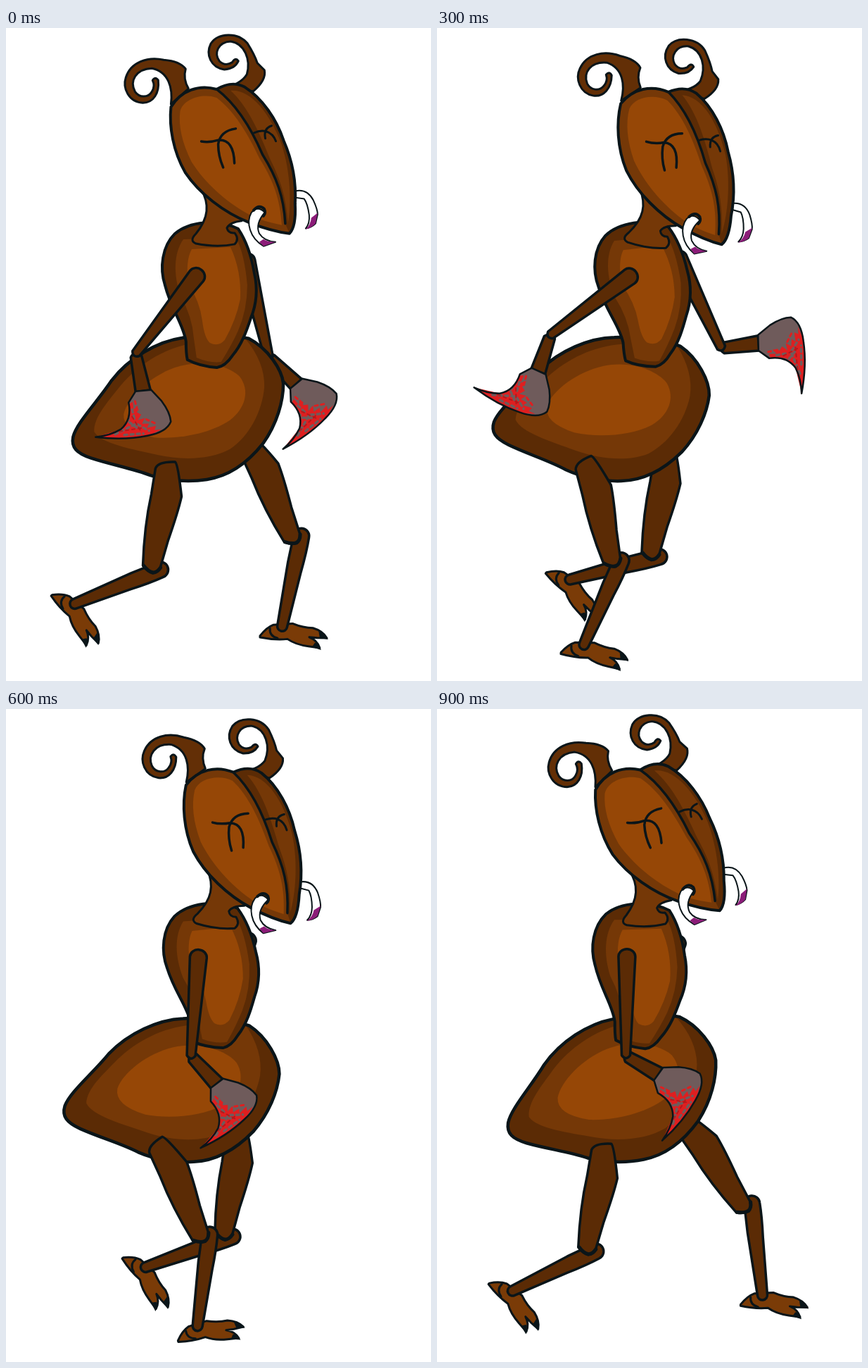
Recreate the animation shown at these times as an HTML page with a canvas. Size 604 px wide and 927 px high, loop 1 s.

```html
<!DOCTYPE html>
<html lang="en">
<head>
<meta charset="utf-8">
<title>Walking ant</title>
<style>
html, body { margin: 0; height: 100%; overflow: hidden; background: #fff; }
canvas { display: block; }
</style>
</head>
<body>
<canvas id="stage" width="604" height="927"></canvas>
<script>
const c = document.getElementById('stage').getContext('2d');
const INK = '#0a1519', DARK = '#5b2b05', MID = '#753807', LIGHT = '#964706';
const GREY = '#6f5b5b', RED = '#de1f20', PURPLE = '#8b1c78';

// Joint angles in degrees at the key steps; limbs hang at 0 and swing forward when positive.
const KEYS = [1, 3, 5, 8, 11];
const JOINTS = {
  head: [2.5, 7.4, 11.6, -5.5],
  nearArm: [-75.7, -53.6, -24.8, 37],
  nearClaw: [-74, -55, -26.6, 73],
  farArm: [44, 25.6, 1, -49],
  farClaw: [76.5, 61.4, 29, -125],
  nearThigh: [-7.6, 16, 43, -8.7],
  nearShin: [-72, -24, 19, -61],
  nearFoot: [51, 8, -36, 42],
  farThigh: [15.7, -8, -33.6, 46],
  farShin: [-30.5, -75.7, -118.5, 25],
  farFoot: [3, 43, 72, 5]
};

function poseAt(step) {
  const s = step < 1 ? step + 10 : step;
  let i = 0;
  while (s >= KEYS[i + 1]) i++;
  const f = (s - KEYS[i]) / (KEYS[i + 1] - KEYS[i]);
  const pose = {};
  for (const name in JOINTS) {
    const v = JOINTS[name];
    pose[name] = v[i] + (v[(i + 1) % 4] - v[i]) * f;
  }
  return pose;
}

function part(x, y, deg, draw) {
  c.save();
  c.translate(x, y);
  c.rotate(deg * Math.PI / 180);
  draw();
  c.restore();
}

const turn = (x, y, deg, draw) => part(x, y, deg, () => {
  c.translate(-x, -y);
  draw();
});

function fill(d, color) {
  c.fillStyle = color;
  c.fill(new Path2D(d));
}

function line(d, width, color = INK) {
  c.strokeStyle = color;
  c.lineWidth = width;
  c.stroke(new Path2D(d));
}

function shape(d, color, width = 3.5) {
  fill(d, color);
  line(d, width);
}

function foot() {
  shape('M-31 12Q-22 0 -12 -4L15 -6Q30 0 44 0Q58 4 64 14L50 14L39 13Q50 17 54 28L38 26Q20 24 8 16Q-10 18 -31 14Z', '#7a3b07', 3);
  fill('M52 3Q60 7 66 16L54 14ZM47 21Q54 22 56 31L43 27Z', INK);
  line('M-17 1Q-18 12 -6 15', 3);
}

function leg(x, y, hips, thigh, shin, toes) {
  turn(257, 455, hips, () => part(x, y, -thigh - 8 - hips, () => {
    part(-11, 152, thigh + 8 - shin, () => {
      part(0, 133, shin + toes - 3, foot);
      shape('M-11 0A11 11 0 0 1 11 0Q12 20 10 50L7 131A7 7 0 0 1 -7 131L-11 40Z', DARK);
    });
    shape('M-18 8Q-14 -2 10 -1Q14 2 19 48Q14 70 0 110L-11 148Q-16 156 -22 157Q-30 154 -36 146Q-34 90 -24 45Z', DARK);
    line('M-35 146Q-21 164 -11 149', 5);
  }));
}

function claw() {
  shape('M-6 4Q-3 -3 6 -4L9 0L22 50L1 53Z', DARK);
  const blade = 'M1 52L-9 68Q-4 92 -20 106Q-35 115 -56 117Q-15 122 18 115Q45 110 51 95Q50 82 38 66L23 50Z';
  fill(blade, GREY);
  fill('M-56 117L-20 106L-7 92L-9 70L-3 67L-2 78L4 72L3 82L9 85L4 93L14 90L10 98L20 98L17 104L30 101L28 107L38 106L24 113Q-5 121 -56 117Z', RED);
  c.setLineDash([4, 5]);
  line('M-28 113L-8 103L2 98L20 108M-15 114L12 112M-4 78L0 94M-8 96L6 106', 3.5, GREY);
  line('M-4 88L8 108M-22 109L10 104', 2, '#b3191b');
  line('M0 66L4 80M16 92L30 98', 3, RED);
  c.setLineDash([]);
  line(blade, 2.5);
}

function arm(x, y, lean, upper, lower) {
  turn(285, 303, lean, () => part(x, y, -upper - lean, () => {
    part(0, 142, upper - lower - 25, claw);
    shape('M-12 0A12 11 0 0 1 12 0L6 140Q0 148 -6 140Z', DARK);
  }));
}

function abdomen() {
  const d = 'M250 440C215 445 175 468 150 500C130 530 100 560 95 580C92 595 100 603 120 610C150 620 180 625 205 635C230 643 260 645 285 641C320 636 345 615 365 590C385 562 394 530 394 505C392 485 372 455 345 441C330 437 270 436 250 440Z';
  fill(d, DARK);
  fill('M262 448C222 456 188 478 163 507C145 530 124 552 125 573C135 590 180 598 215 606C250 614 290 613 318 598C345 580 364 545 367 510Q368 475 340 441Z', MID);
  fill('M167 548C172 525 205 494 240 482C275 470 315 478 332 495C347 515 340 540 318 557C290 576 245 584 210 581Q165 572 167 548Z', LIGHT);
  line(d, 4.5);
}

function thorax() {
  const d = 'M240 292C222 310 218 340 226 365C235 400 252 420 256 445Q256 462 258 471Q275 480 300 482Q312 480 322 465C335 450 342 430 348 412C357 390 358 370 353 348C348 318 340 300 330 285C300 270 260 275 240 292Z';
  fill(d, DARK);
  fill('M252 300C238 320 238 350 248 380Q265 410 267 440L271 468Q290 476 306 474Q321 450 330 430Q343 400 343 365Q339 320 327 298Z', MID);
  fill('M264 314Q255 330 259 362Q276 390 279 415Q282 440 290 447Q302 453 311 443Q327 415 333 385Q335 345 319 311Z', LIGHT);
  line(d, 4);
}

function head() {
  // neck
  shape('M277 228C290 250 288 270 270 292Q260 302 270 306Q300 312 325 307Q332 300 325 291Q316 292 314 284Q318 276 335 274L320 220Z', MID, 3);
  // far mandible
  shape('M411 232Q428 228 437 245Q443 258 443 265L440 278Q434 284 426 285Q432 278 431 266Q429 250 424 243L411 241Z', '#fff', 2);
  fill('M443 263L440 278Q433 285 426 286Q433 280 434 270Z', PURPLE);
  // antennae
  shape('M308 86Q335 80 343 66C349 45 340 22 320 19C302 20 296 36 304 47Q312 55 322 49Q327 41 331 47Q326 58 311 59C292 56 284 38 292 22C302 7 330 5 344 22Q354 38 358 50L368 60Q371 74 352 90Z', '#632f06', 3);
  shape('M235 108C238 85 232 62 208 57C185 58 176 75 184 90C190 99 203 99 208 90Q213 82 209 74Q213 68 217 74C219 92 210 106 195 106C175 105 166 85 171 70C178 48 202 40 225 45Q248 47 256 58Q252 72 260 86Z', '#632f06', 3);
  // skull
  const skull = 'M235 112C232 140 238 175 255 205C275 235 310 262 345 276C365 284 385 290 403 292C410 285 412 270 411 250C413 220 408 190 395 160C385 130 365 100 340 84C325 76 312 80 300 87C275 80 250 88 235 112Z';
  fill(skull, MID);
  fill('M300 87C330 110 350 145 365 180C385 212 395 240 397 278L403 292C410 285 412 270 411 250C413 220 408 190 395 160C385 130 365 100 340 84Q322 76 300 87Z', DARK);
  fill('M320 89C348 87 375 120 392 165C405 205 406 250 401 277C398 240 390 215 376 187C362 152 345 112 320 89Z', MID);
  fill('M248 118C253 100 280 92 300 99C325 118 344 150 361 186C381 218 390 245 392 280Q360 274 342 263C312 246 283 220 264 190Q244 150 248 118Z', LIGHT);
  line('M300 87C330 110 350 145 365 180C385 212 395 240 397 278', 3.5);
  line(skull, 4);
  // eyes
  line('M278 161Q290 163 303 159Q324 158 325 192M327 143Q305 146 302 165Q302 182 309 198', 3.5);
  line('M353 149Q362 145 370 147Q380 150 384 161M378 139Q366 143 369 157', 3);
  // near mandible
  shape('M368 262Q358 252 349 262C341 276 346 298 366 310L383 304Q367 303 360 292Q354 278 368 262Z', '#fff', 2);
  fill('M360 304L366 310L383 304Q371 304 366 300Z', PURPLE);
  line('M352 259Q360 250 367 257Q370 263 366 267', 4);
}

function draw(p) {
  const hips = p.head * 0.95, lean = p.head * -0.46;
  c.clearRect(0, 0, 604, 927);
  arm(342, 331, lean, p.farArm, p.farClaw);
  leg(344, 589, hips, p.farThigh, p.farShin, p.farFoot);
  turn(257, 455, hips, abdomen);
  turn(285, 303, lean, thorax);
  leg(230, 617, hips, p.nearThigh, p.nearShin, p.nearFoot);
  turn(285, 312, p.head, head);
  arm(271, 352, lean, p.nearArm, p.nearClaw);
}

c.lineJoin = c.lineCap = 'round';
const start = performance.now();
function tick() {
  draw(poseAt(Math.floor((performance.now() - start) / 100) % 10));
  requestAnimationFrame(tick);
}
tick();
</script>
</body>
</html>
```
